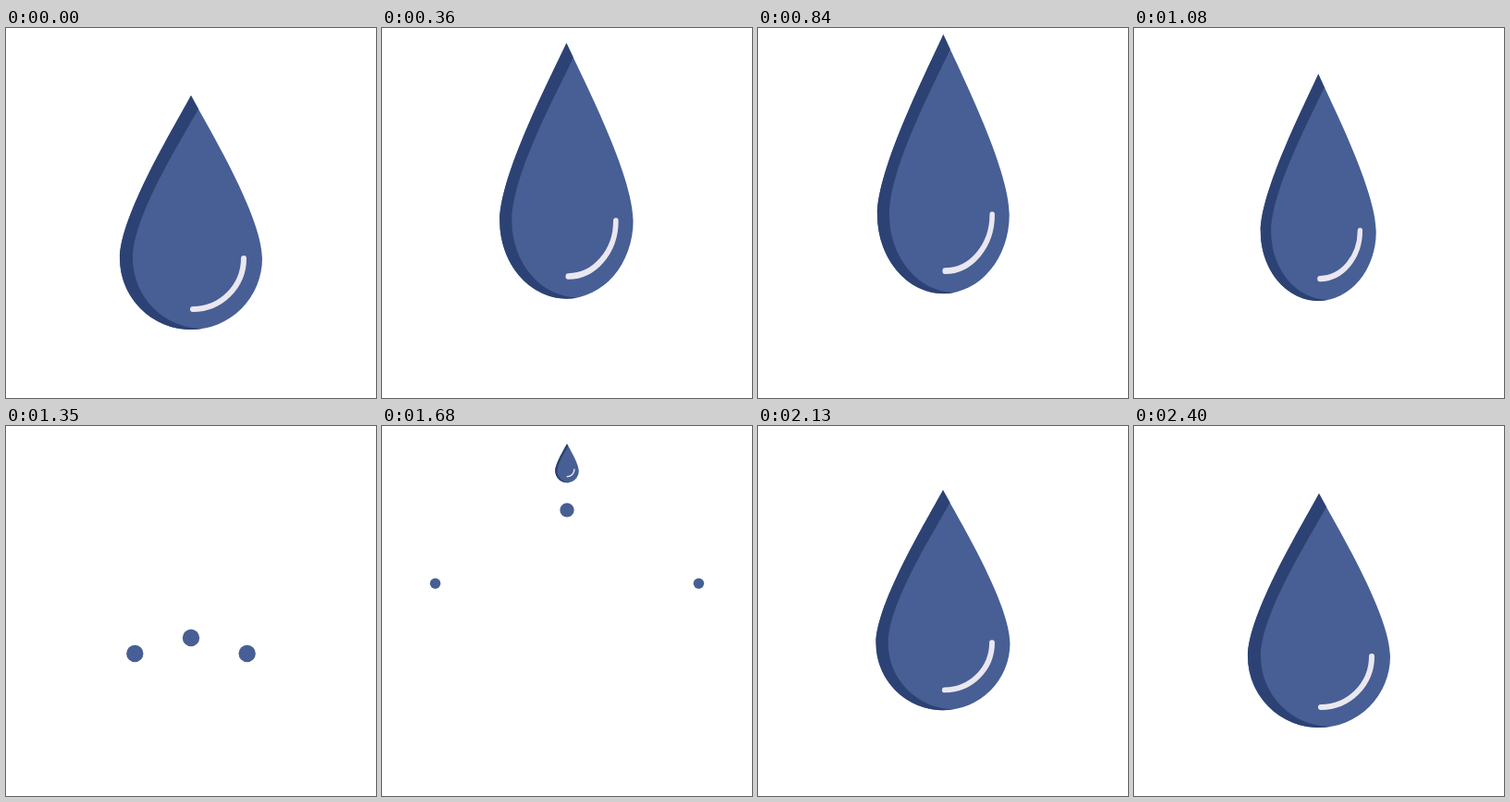
These frames come from a looping animation (400 by 400 pixels, 4.46 s). An HTML page:

```html
<!DOCTYPE html>
<html lang="en">
<head>
<meta charset="utf-8">
<title>Water drop</title>
<style>
  html, body { margin: 0; width: 100%; height: 100%; overflow: hidden; background: #fff; }
  svg { display: block; width: 100vw; height: 100vh; }
</style>
</head>
<body>
<svg viewBox="0 0 400 400">
  <g fill="#475f94">
    <circle class="bead"/>
    <circle class="bead"/>
    <circle class="bead"/>
  </g>
  <g id="drop">
    <path fill="#475f94" d="M0 -126.5C18 -93 77 4 77 49.5A77 77 0 0 1 -77 49.5C-77 4 -18 -93 0 -126.5Z"/>
    <path fill="#2d4274" d="M0 -126.5L8 -112C-10 -79 -63 4 -63 49.5A76 76 0 0 0 13 125.5A77 77 0 0 1 -77 49.5C-77 4 -18 -93 0 -126.5Z"/>
    <path id="shine" fill="none" stroke="#ebe7f0" stroke-linecap="round" d="M57 49.5A55 55 0 0 1 2 104.5"/>
  </g>
</svg>
<script>
  const LOOP = 4460, STEP = 30, MOVE_END = 2400;
  const FALL = 880, HIT = 1280, SPLASH = 1260, REFORM = 1630;
  const drop = document.getElementById('drop');
  const shine = document.getElementById('shine');
  const beads = document.querySelectorAll('.bead');

  const lerp = (a, b, p) => a + (b - a) * p;
  const span = (t, a, b) => Math.min(1, Math.max(0, (t - a) / (b - a)));
  const easeOut = (u, n) => 1 - Math.pow(1 - u, n);

  function placeDrop(x, y, sx, sy, loss) {
    const k = 1 - 0.2 * loss;
    drop.setAttribute('transform', `translate(${x} ${y}) scale(${sx} ${sy})`);
    shine.setAttribute('transform', `scale(${k})`);
    shine.setAttribute('stroke-width', 6 * (1 + loss));
  }

  function drawDrop(t) {
    const visible = t < HIT || t > REFORM;
    drop.style.display = visible ? '' : 'none';
    if (!visible) return;
    if (t < HIT) {
      // leap up and stretch with a slight tremble, then fall and shrink
      const up = easeOut(span(t, 0, 750), 3);
      const down = Math.pow(span(t, FALL, HIT), 3);
      const shake = 0.7 * up * Math.cos(2 * Math.PI * t / 144);
      const y = lerp(lerp(199.5, 147, up), 350, down);
      placeDrop(200 + shake, y, lerp(1, 0.927, up) * (1 - down), lerp(1, 1.107, up) * (1 - down), down);
    } else {
      const s = easeOut(span(t, REFORM, MOVE_END), 2.7);
      placeDrop(200, lerp(8.6, 199.5, s), s, s, 1 - s);
    }
  }

  function drawBeads(t) {
    const age = t - SPLASH;
    const reach = 144 * easeOut(span(age, 0, 540), 3);
    beads.forEach((bead, i) => {
      const side = i - 1;
      const speed = side ? 1.219 : 1.408;
      const shrink = side ? span(t, 1560, 1880) : span(t, 1620, 1980);
      bead.setAttribute('cx', 200 + side * reach);
      bead.setAttribute('cy', 340 - speed * age + 0.00194 * age * age);
      bead.setAttribute('r', age > 0 ? 9.2 * (1 - shrink) : 0);
    });
  }

  function draw(ms) {
    const t = Math.min(MOVE_END, Math.floor(ms % LOOP / STEP) * STEP);
    drawDrop(t);
    drawBeads(t);
  }

  const start = performance.now();
  function tick() {
    draw(performance.now() - start);
    requestAnimationFrame(tick);
  }
  tick();
</script>
</body>
</html>
```
